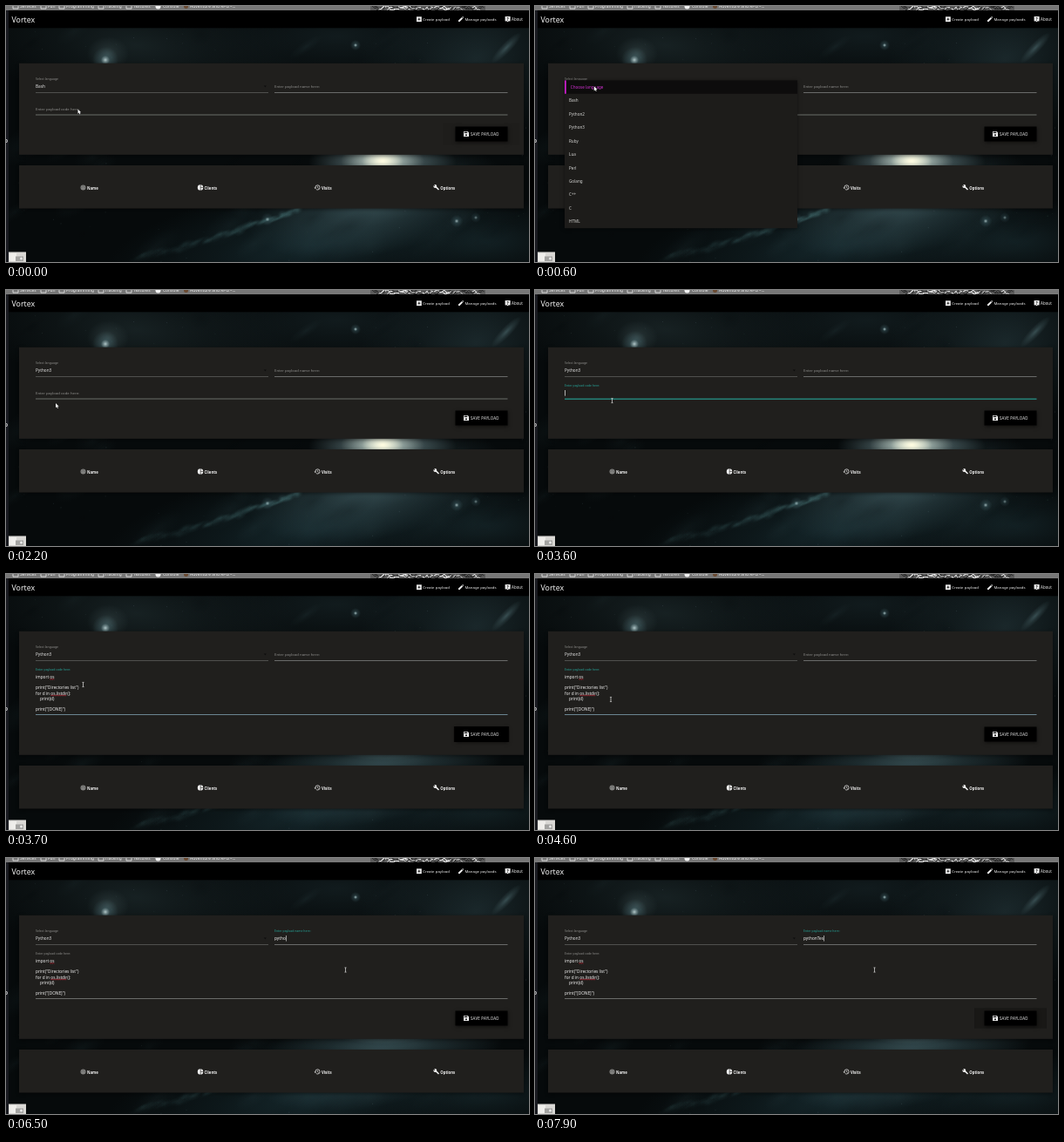
An HTML page with a canvas that plays this animation: 600x294 px, repeating every 8000 ms.

```html
<!DOCTYPE html>
<html lang="en">
<head>
<meta charset="utf-8">
<title>Payload editor</title>
<style>
  html, body { margin: 0; width: 100%; height: 100%; overflow: hidden; background: #000; }
  canvas { display: block; width: 600px; height: 294px; }
</style>
</head>
<body>
<canvas id="stage" width="600" height="294"></canvas>
<script>
const W = 600, H = 294, LOOP = 8000, STEP = 100;
const WHITE = '#f2f2f2', GRAY = '#8f8f8d', RULE = '#7e7f7d', TEAL = '#26a69a';
const OPEN_AT = 500, PICK_AT = 1900, CODE_FOCUS = 2700, PASTE_AT = 3700, NAME_FOCUS = 5100;

const LANGUAGES = ['Bash', 'Python2', 'Python3', 'Ruby', 'Lua', 'Perl', 'Golang', 'C++', 'C', 'HTML'];
const CODE = ['import os', '', 'print("Directories list")', 'for d in os.listdir():', '    print(d)', '', 'print("[DONE]")'];
const TYPING = [[6100, 'py'], [6300, 'pyt'], [6500, 'pytho'], [6700, 'python'],
  [7500, 'pythonT'], [7700, 'pythonTe'], [7900, 'pythonTes']];
const POINTER = [[0, 82.5, 118.5], [300, 76, 104], [500, 68, 92], [1000, 67, 93], [1200, 59, 116],
  [1700, 55, 136], [1900, 55, 136], [2200, 57, 130], [2500, 57, 130], [2800, 88.5, 127], [3900, 88.5, 127],
  [4300, 70, 150], [4600, 87, 144], [4900, 100, 128], [5000, 150, 115], [5300, 332, 97], [5600, 332, 97], [5900, 389.5, 128.5]];

const canvas = document.getElementById('stage');
let ctx = canvas.getContext('2d');

const clamp = v => Math.min(1, Math.max(0, v));
const mix = (a, b, k) => a + (b - a) * k;
const ramp = (t, start, length) => clamp((t - start) / length);
const easeOut = k => 1 - (1 - k) ** 2;

function rect(x, y, w, h, color) {
  ctx.fillStyle = color;
  ctx.fillRect(x, y, w, h);
}

function disc(x, y, r, color) {
  ctx.fillStyle = color;
  ctx.beginPath();
  ctx.arc(x, y, r, 0, 7);
  ctx.fill();
}

function path(points, color, width) {
  ctx.beginPath();
  points.forEach(([x, y], i) => i ? ctx.lineTo(x, y) : ctx.moveTo(x, y));
  if (width) {
    ctx.strokeStyle = color;
    ctx.lineWidth = width;
    ctx.stroke();
  } else {
    ctx.fillStyle = color;
    ctx.fill();
  }
}

function shadowed(blur, dy, alpha, draw) {
  ctx.save();
  ctx.shadowColor = `rgba(0,0,0,${alpha})`;
  ctx.shadowBlur = blur;
  ctx.shadowOffsetY = dy;
  draw();
  ctx.restore();
}

// Text is set ten times larger and scaled down so small sizes keep true advances.
const font = (size, weight) => `${weight} ${size * 10}px "Noto Sans", sans-serif`;

function text(s, x, y, size, color, weight = 400, spacing = 0) {
  ctx.save();
  ctx.translate(x, y + size * 0.35 + 0.3);
  ctx.scale(0.1, 0.1);
  ctx.font = font(size, weight);
  ctx.letterSpacing = spacing * 10 + 'px';
  ctx.fillStyle = color;
  ctx.fillText(s, 0, 0);
  ctx.restore();
}

function textWidth(s, size) {
  ctx.font = font(size, 400);
  return ctx.measureText(s).width / 10;
}

function glow(x, y, rx, ry, angle, rgb, alpha) {
  ctx.save();
  ctx.translate(x, y);
  ctx.rotate(angle);
  ctx.scale(rx, ry);
  const g = ctx.createRadialGradient(0, 0, 0, 0, 0, 1);
  g.addColorStop(0, `rgba(${rgb},${alpha})`);
  g.addColorStop(0.45, `rgba(${rgb},${alpha * 0.45})`);
  g.addColorStop(1, `rgba(${rgb},0)`);
  ctx.fillStyle = g;
  ctx.fillRect(-1, -1, 2, 2);
  ctx.restore();
}

function randomizer(seed) {
  return () => (seed = (seed * 16807) % 2147483647) / 2147483647;
}

function star(x, y, r, alpha) {
  glow(x, y, r * 3, r * 3, 0, '110,160,170', alpha * 0.5);
  glow(x, y, r, r, 0, '205,225,225', alpha);
}

// Knots of gas strung along a gently bent ridge, brightest near its upper end.
function ridge(rnd) {
  for (let i = 0; i < 60; i++) {
    const k = i / 59, bright = k ** 2;
    const x = mix(150, 336, k), y = mix(287, 233, k ** 1.3);
    glow(x + rnd() * 6 - 3, y + rnd() * 6 - 3, 5 + rnd() * 9, 2 + rnd() * 3, -0.45, '92,150,152', 0.05 + bright * 0.24);
  }
}

function nebula() {
  const rnd = randomizer(77);
  rect(0, 0, W, H, '#060a0b');
  glow(150, 45, 190, 75, 0.1, '34,48,50', 0.6);
  glow(380, 35, 200, 60, 0, '22,34,37', 0.7);
  glow(540, 60, 140, 100, -0.3, '36,54,58', 0.65);
  glow(350, 275, 240, 75, -0.15, '28,52,58', 0.7);
  glow(425, 225, 150, 60, -0.2, '74,104,110', 0.7);
  glow(550, 270, 130, 50, 0, '24,42,46', 0.7);
  glow(574, 48, 24, 6, -0.8, '100,135,140', 0.45);
  for (let i = 0; i < 70; i++) {
    const x = rnd() * W, y = 25 + rnd() * 269;
    glow(x, y, 12 + rnd() * 28, 6 + rnd() * 12, -0.6, i % 2 ? '60,88,92' : '0,4,6', 0.05 + rnd() * 0.1);
  }
  ridge(rnd);
  glow(432, 180, 85, 34, 0, '150,185,190', 0.8);
  glow(432, 178, 48, 22, 0, '225,232,215', 0.9);
  glow(432, 178, 24, 14, 0, '255,252,225', 1);
  glow(117, 55, 24, 20, 0, '70,90,92', 0.5);
  star(114, 62, 5, 0.8);
  star(401, 45, 2, 0.8);
  star(517, 247, 2.4, 0.7);
  star(539, 243, 2, 0.5);
  star(300, 245, 2.5, 0.6);
  for (let i = 0; i < 110; i++) {
    rect(rnd() * W, 25 + rnd() * 269, 0.8, 0.8, `rgba(170,205,210,${rnd() * 0.25})`);
  }
}

function bookmarks() {
  const rnd = randomizer(19);
  rect(0, 0, W, 5, '#777777');
  rect(418, 0, 132, 5, '#5c5c5c');
  for (let i = 0; i < 50; i++) {
    const x = 420 + i * 2.5;
    path([[x, rnd() * 5], [x + 3, rnd() * 5], [x + 6, rnd() * 5]], rnd() < 0.62 ? '#f0f0f0' : '#242424', 1);
  }
  const items = [['Services', 16], ['Fun', 48], ['Programming', 69], ['Hacking', 114],
    ['Textures', 146], ['Console', 180], ['Adventure and RPG –…', 211]];
  items.forEach(([label, x], i) => {
    text(label, x, 0.1, 4.9, '#f0f0f0');
    if (i < 5) path([[x - 8, -1], [x - 8, 3], [x - 2, 3], [x - 2, -1]], '#eeeeee', 0.8);
  });
  disc(174.5, 0.5, 3, '#f2f2f2');
  disc(206.5, 0.5, 2.5, '#6b4a31');
}

function pencil(x, y) {
  path([[x, y + 6], [x, y + 4.6], [x + 3.9, y + 0.9], [x + 5.2, y + 2.2], [x + 1.5, y + 6]], WHITE);
  path([[x + 4.3, y + 0.5], [x + 5, y], [x + 6.1, y + 1.1], [x + 5.6, y + 1.8]], WHITE);
}

function navigation() {
  rect(3, 5, W - 3, 20.3, '#000');
  text('Vortex', 6.5, 15.5, 8.8, WHITE);
  rect(471, 12.3, 5.8, 5.8, WHITE);
  path([[472.4, 15.2], [475.4, 15.2]], '#000', 0.8);
  path([[473.9, 13.7], [473.9, 16.7]], '#000', 0.8);
  text('Create payload', 478.2, 15.4, 4.35, WHITE);
  pencil(519, 12);
  text('Manage payloads', 526.4, 15.4, 4.35, WHITE);
  rect(572.6, 12, 6, 5.4, WHITE);
  path([[574.6, 17], [575.6, 18.6], [576.6, 17]], WHITE);
  text('?', 574.6, 14.6, 4.6, '#000', 700);
  text('About', 580, 15.4, 4.5, WHITE);
}

function desktopEdge() {
  rect(0, 5, 3, H - 5, '#191a20');
  disc(0, 155, 1.9, '#d8d8d8');
  disc(0, 155, 0.9, '#191a20');
  rect(3, 282.5, 20, 11.5, '#d9d8d5');
  rect(4, 284, 8, 9, '#efeeeb');
  rect(11, 287.5, 9, 5.5, '#a3a3a1');
  disc(17.5, 290, 1.5, '#e8e8e8');
}

const backdrop = document.createElement('canvas');
backdrop.width = W;
backdrop.height = H;
{
  const screen = ctx;
  ctx = backdrop.getContext('2d');
  nebula();
  bookmarks();
  navigation();
  desktopEdge();
  ctx = screen;
}

function panel(y, h) {
  shadowed(4, 1, 0.45, () => rect(15, y, 579, h, '#201f1d'));
}

function underline(x, y, right, color, weight = 0.8) {
  rect(x, y, right - x, weight, color);
}

function floatingLabel(s, x, restY, raisedY, raise, focused) {
  text(s, x, mix(restY, raisedY, raise), mix(4.3, 3.44, raise), focused ? TEAL : GRAY);
}

function fingerprint(x, y) {
  disc(x, y, 3, '#858583');
  for (const r of [1, 2]) {
    ctx.strokeStyle = '#5c5c5a';
    ctx.lineWidth = 0.4;
    ctx.beginPath();
    ctx.arc(x, y, r, 2.4, 7.1);
    ctx.stroke();
  }
}

function pie(x, y) {
  disc(x, y, 3.2, WHITE);
  path([[x + 0.2, y - 3.2], [x + 0.2, y + 3.2]], '#201f1d', 0.6);
  path([[x + 0.2, y], [x + 3.2, y]], '#201f1d', 0.6);
}

function history(x, y) {
  ctx.strokeStyle = WHITE;
  ctx.lineWidth = 0.75;
  ctx.beginPath();
  ctx.arc(x, y, 2.6, -Math.PI, 2.3);
  ctx.stroke();
  path([[x - 4, y], [x - 1.3, y], [x - 2.6, y + 1.5]], WHITE);
  path([[x, y - 1.5], [x, y + 0.2], [x + 1.2, y + 0.9]], WHITE, 0.6);
}

function wrench(x, y) {
  disc(x - 1.5, y - 1.4, 1.9, WHITE);
  path([[x - 1, y - 1], [x + 2.7, y + 2.6]], WHITE, 1.5);
  path([[x - 3.7, y - 3.3], [x - 1.8, y - 1.7]], '#201f1d', 1.1);
}

function tableHead(y) {
  const columns = [['Name', 93, fingerprint], ['Clients', 227.5, pie], ['Visits', 362, history], ['Options', 498.3, wrench]];
  for (const [label, x, icon] of columns) {
    icon(x - 4.5, y - 0.1);
    text(label, x, y + 0.3, 4.3, WHITE, 700);
  }
}

function bezier(x1, y1, x2, y2, x) {
  const at = (a, b, s) => 3 * a * s * (1 - s) ** 2 + 3 * b * s * s * (1 - s) + s ** 3;
  let lo = 0, hi = 1;
  for (let i = 0; i < 20; i++) {
    const mid = (lo + hi) / 2;
    if (at(x1, x2, mid) < x) lo = mid; else hi = mid;
  }
  return at(y1, y2, lo);
}

function saveButton(t, y) {
  const cx = 545.5, beat = ((t + 370) % 1000) / 500;
  if (beat < 1) {
    const k = bezier(0.24, 0, 0.38, 1, beat), scale = 1 + k / 2;
    rect(cx - 30 * scale, y - 8.5 * scale, 60 * scale, 17 * scale, `rgba(0,0,0,${1 - k})`);
  }
  shadowed(4, 1, 0.5, () => rect(cx - 30, y - 8.5, 60, 17, '#000'));
  path([[525, y - 3], [529.8, y - 3], [531, y - 1.8], [531, y + 3], [525, y + 3]], WHITE);
  rect(525.7, y - 2.3, 3.6, 1.3, '#000');
  disc(528, y + 1.2, 0.95, '#000');
  text('SAVE PAYLOAD', 533, y + 0.2, 4.4, WHITE, 400, 0.2);
}

function squiggle(x, y, width) {
  const points = [];
  for (let i = 0; i <= width; i++) points.push([x + i, y + (i % 2 ? 0.35 : -0.35)]);
  path(points, '#d02a3a', 0.7);
}

function misspelled(line, word, y) {
  const x = 34 + textWidth(line.slice(0, line.indexOf(word)), 4.75);
  squiggle(x, y + 2.9, textWidth(word, 4.75));
}

function codeText() {
  CODE.forEach((line, i) => {
    const y = 118 + i * 6.2;
    text(line, 34, y, 4.75, WHITE);
    if (i === 0) misspelled(line, 'os', y);
    if (i === 3) misspelled(line, 'os.listdir', y);
  });
}

function form(t, pasted) {
  text('Select language', 34, 83.6, 3.5, GRAY);
  text(t < PICK_AT ? 'Bash' : 'Python3', 34, 92.5, 4.7, '#e4e4e4');
  path([[295.8, 91.6], [298.8, 91.6], [297.3, 93.2]], '#0c0c0c');
  underline(34, 99, 301, '#5c5d5b');

  const nameRaise = easeOut(ramp(t, NAME_FOCUS, 200));
  floatingLabel('Enter payload name here:', 308, 92.1, 83.7, nameRaise, t >= NAME_FOCUS);
  underline(308, 99, 575.5, RULE);
  if (t >= NAME_FOCUS) {
    const typed = TYPING.reduce((s, [at, value]) => t >= at ? value : s, '');
    text(typed, 308, 92.3, 4.75, WHITE);
    rect(308.2 + textWidth(typed, 4.75), 89, 0.6, 6.6, WHITE);
  }

  const codeFocused = t >= CODE_FOCUS && t < NAME_FOCUS;
  floatingLabel('Enter payload code here:', 34, 118, 109.7, easeOut(ramp(t, CODE_FOCUS, 200)), codeFocused);
  if (pasted) {
    codeText();
    underline(34, 161, 575.5, codeFocused ? '#7f9fb0' : RULE);
  } else {
    underline(34, 124.6, 575.5, codeFocused ? TEAL : RULE, codeFocused ? 1.1 : 0.8);
    if (t >= 3600) rect(34.2, 115, 0.7, 6.6, WHITE);
  }
}

function dropdown(t) {
  const alpha = Math.min(ramp(t, OPEN_AT - 50, 150), 1 - ramp(t, PICK_AT, 250));
  if (alpha <= 0) return;
  ctx.save();
  ctx.globalAlpha = alpha;
  shadowed(4, 1, 0.5, () => rect(34, 85.4, 267, 169.8, '#1d1c1a'));
  rect(34, 85.4, 267, 15.4, '#0d0c0c');
  rect(34, 85.4, 1.8, 15.4, '#c81ec8');
  text('Choose language', 40.8, 93, 4.6, '#d12fd1');
  LANGUAGES.forEach((name, i) => text(name, 39, 108.5 + i * 15.43, 4.6, '#d6d6d4'));
  ctx.restore();
}

function pointer(t) {
  let i = POINTER.findIndex(([at]) => at > t);
  if (i < 0) i = POINTER.length;
  const a = POINTER[i - 1], b = POINTER[i] || a;
  const k = b === a ? 0 : (t - a[0]) / (b[0] - a[0]);
  const x = mix(a[1], b[1], k), y = mix(a[2], b[2], k);
  if (t < CODE_FOCUS) {
    const arrow = [[0, 0], [0, 5.2], [1.2, 4.1], [2, 5.9], [2.9, 5.5], [2.1, 3.8], [3.7, 3.7]]
      .map(([dx, dy]) => [x + dx, y + dy]);
    path([...arrow, arrow[0]], '#111', 0.8);
    path(arrow, '#fff');
  } else {
    path([[x, y - 2.6], [x, y + 2.6]], '#e6e6e6', 0.7);
    for (const dy of [-2.6, 2.6]) path([[x - 1.1, y + dy], [x + 1.1, y + dy]], '#e6e6e6', 0.6);
  }
}

function draw(t) {
  const pasted = t >= PASTE_AT, shift = pasted ? 37 : 0;
  ctx.drawImage(backdrop, 0, 0);
  panel(65.8, 105 + shift);
  panel(183 + shift, 49.5);
  form(t, pasted);
  saveButton(t, 147 + shift);
  tableHead(208.5 + shift);
  dropdown(t);
  pointer(t);
}

const began = performance.now();
function tick() {
  const t = (performance.now() - began) % LOOP;
  draw(Math.floor(t / STEP) * STEP);
  requestAnimationFrame(tick);
}
tick();
</script>
</body>
</html>
```
